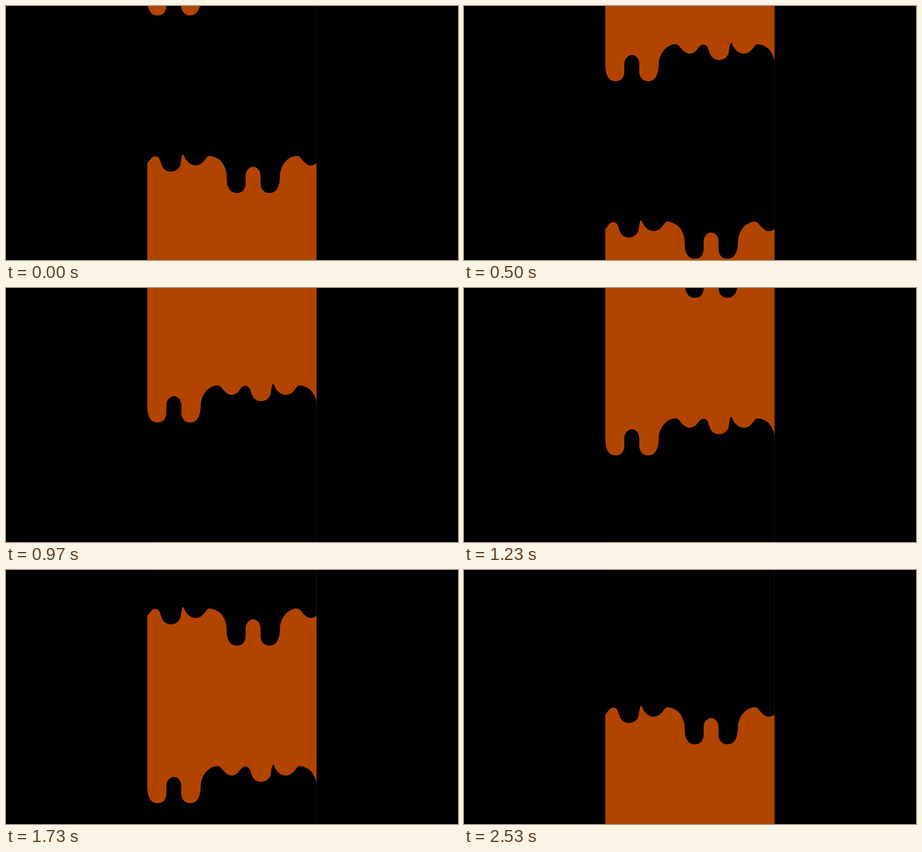
An HTML page for the animation above (2560 ms loop, 998 by 561 pixels).

```html
<!DOCTYPE html>
<html lang="en">
<head>
<meta charset="utf-8">
<title>Dripping paint</title>
<style>
  html, body { margin: 0; width: 100%; height: 100%; overflow: hidden; background: #000; }
  svg { display: block; }
</style>
</head>
<body>
<svg width="998" height="561" viewBox="0 0 998 561">
  <defs>
    <!-- One tile of paint: everything above the dripping edge, 374 wide -->
    <path id="tile" d="M0 16 C6 11 8 1 18 1 C28 1 29 14 32 21 C36 31 44 35 52 35
      C61 35 69 30 73 21 C75 10 76 -3 79 -3 C81 -3 82 4 86 9 C92 17 99 21 107 21
      C117 21 123 14 128 8 C131 4 133 0 137 0 C145 0 156 5 162 11
      C169 18 175 32 175 42 C175 60 177 82 198 82 C213 82 217 70 217 60
      L217 44 C217 32 226 24 234 24 C242 24 250 32 250 44 L250 60
      C250 70 255 82 270 82 C289 82 293 60 293 42 C294 24 307 2 329 0
      C337 0 339 6 343 10 C348 16 354 21 361 21 C366 21 370 19 374 16
      V-1800 H0 Z"/>
    <g id="orange" fill="#b24401">
      <use href="#tile" x="-175"/>
      <use href="#tile" x="199"/>
    </g>
    <use id="black" href="#tile" fill="#010104"/>
  </defs>
  <rect width="998" height="561" fill="#000"/>
  <svg x="312" width="373.5" height="561" overflow="hidden">
    <rect width="374" height="561" fill="#010104"/>
    <g id="paint">
      <use href="#orange" y="679"/>
      <use href="#black" y="331"/>
      <use href="#orange" y="-61"/>
      <use href="#black" y="-409"/>
    </g>
  </svg>
</svg>
<script>
  const LOOP = 2560, TICK = 100 / 3;
  const STEP = 14.53;       // fall per step, px
  const RATE = 50 / 77;     // steps per tick
  const paint = document.getElementById('paint');

  function draw(ms) {
    const tick = Math.floor((ms % LOOP + 4) / TICK) % 77;
    const fall = STEP * Math.floor(tick * RATE + 0.4);
    paint.setAttribute('transform', `translate(0 ${fall.toFixed(2)})`);
  }

  let start = null;
  function loop(now) {
    if (start === null) start = now;
    draw(Math.max(0, now - start));
    requestAnimationFrame(loop);
  }
  draw(0);
  requestAnimationFrame(loop);
</script>
</body>
</html>
```
